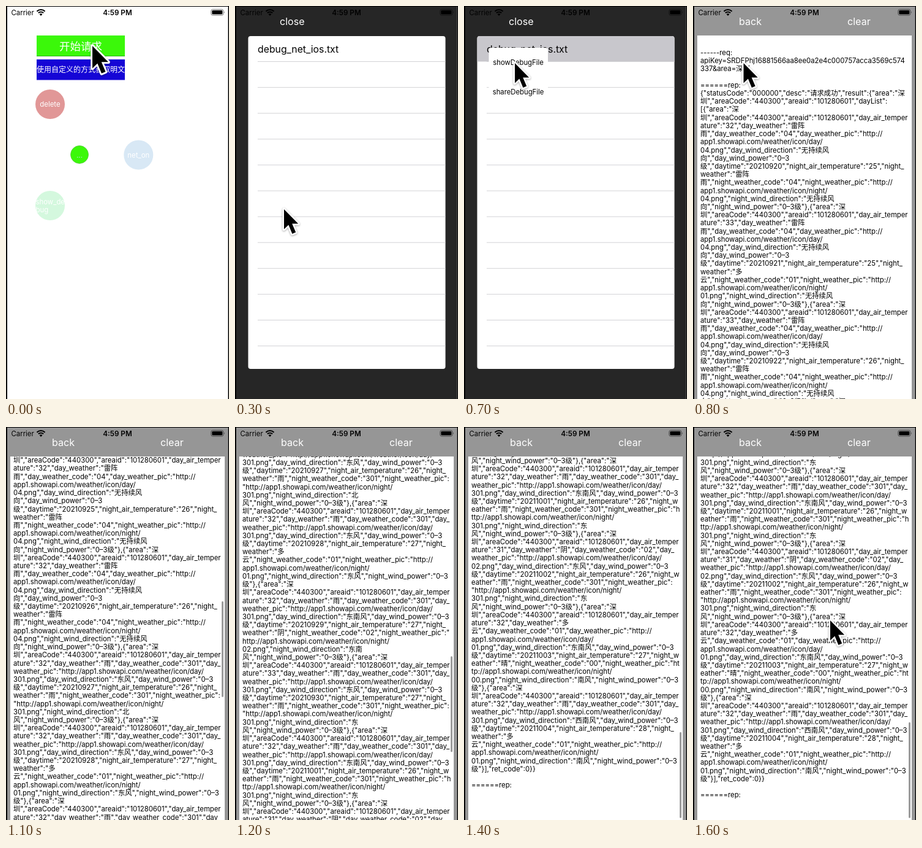
Animation, 364 px wide and 640 px high, one loop 1700 ms. Source, as an HTML page:

```html
<!DOCTYPE html>
<html lang="zh">
<head>
<meta charset="utf-8">
<title>Debug log viewer</title>
<style>
html, body { margin: 0; width: 100%; height: 100%; overflow: hidden; background: #000; }
svg { display: block; width: 100%; height: 100%; }
text { font-family: Inter, "Noto Sans CJK SC", "Noto Sans CJK", sans-serif; white-space: pre; }
.mid { text-anchor: middle; }
.white { fill: #fff; }
.small { font-size: 11.4px; }
.title { font-size: 16.1px; }
</style>
</head>
<body>
<svg viewBox="0 0 364 640" xmlns="http://www.w3.org/2000/svg">
  <defs>
    <clipPath id="view"><rect x="7" y="48" width="350" height="592"/></clipPath>
    <clipPath id="bubble"><circle cx="72" cy="325" r="24"/></clipPath>
  </defs>
  <rect width="364" height="640"/>
  <rect x="2" y="1" width="360.5" height="639" fill="#fff"/>

  <g id="status">
    <text x="8.5" y="14.5" class="small">Carrier</text>
    <g fill="none" stroke="#000" stroke-width="2">
      <path d="M50.4 8.7A9.6 9.6 0 0 1 63.6 8.7"/>
      <path d="M52.8 11.3A6.2 6.2 0 0 1 61.2 11.3"/>
    </g>
    <path d="M57 16L54.6 13.4A3.6 3.6 0 0 1 59.4 13.4Z"/>
    <text x="182" y="14.7" class="mid" font-size="11.7" font-weight="600">4:59 PM</text>
    <rect x="334.8" y="5.5" width="20" height="9.6" rx="2.6" fill="none" stroke="#777"/>
    <rect x="336.3" y="7" width="17" height="6.6" rx="1.4"/>
    <path d="M356 8.6Q357.8 10.3 356 12Z" fill="#777"/>
  </g>

  <g id="menu">
    <rect x="50" y="48" width="144" height="34" fill="#3bf80a"/>
    <path d="M50 81.5H194" stroke="#2cae10"/>
    <text x="122" y="71.5" class="mid white" font-size="17.5" font-weight="300">开始请求</text>
    <rect x="50" y="87" width="144" height="33.5" fill="#1505d6"/>
    <text x="122" y="108.4" class="mid white" font-size="12" font-weight="300">使用自定义的方式获取明文</text>
    <circle cx="72" cy="160" r="24" fill="#e19797"/>
    <text x="72" y="164" class="mid white small">delete</text>
    <circle cx="216.3" cy="242.5" r="24" fill="#d8e8f5"/>
    <text x="216.3" y="246.5" class="mid white small">net_on</text>
    <circle cx="120" cy="242" r="14.5" fill="#3bf80a" stroke="#55c93c" stroke-width=".8"/>
    <text x="120" y="247" class="mid small" fill="#b9d8f2">...</text>
    <circle cx="72" cy="325" r="24" fill="#d4f8de"/>
    <g clip-path="url(#bubble)">
      <text x="48.5" y="322.5" class="white small">show_de</text>
      <text x="48.5" y="336" class="white small">bug</text>
    </g>
  </g>

  <rect id="dim" x="2" y="1" width="360.5" height="639"/>

  <g id="list">
    <text x="73" y="30.8" class="title white">close</text>
    <rect x="21.5" y="49" width="322" height="542" rx="4" fill="#fff"/>
    <path id="picked" d="M21.5 90.5V53a4 4 0 0 1 4-4H339.5a4 4 0 0 1 4 4V90.5Z" fill="#c8c7cc"/>
    <path id="rules" stroke="#cfcfd2" stroke-width=".9"/>
    <text x="37" y="75.6" font-size="15.8">debug_net_ios.txt</text>
    <g id="popup">
      <rect x="40.5" y="68" width="96.5" height="96" rx="4" fill="#fff"/>
      <text x="88.5" y="96" class="mid" font-size="11.3">showDebugFile</text>
      <text x="88.5" y="144" class="mid" font-size="11.3">shareDebugFile</text>
    </g>
  </g>

  <g id="log">
    <text x="75" y="30.8" class="title white">back</text>
    <text x="252" y="30.8" class="title white">clear</text>
    <rect x="7" y="48" width="350" height="592" fill="#fff"/>
    <g clip-path="url(#view)"><g id="lines"></g></g>
    <rect id="bar" x="352" width="3" rx="1.5" fill="#9b9b9b"/>
  </g>

  <path id="cursor" d="M0 0V32.5L7.4 25.4L13.4 40L19.2 37.6L13.2 23.4H23.2Z"
    stroke="#fff" stroke-width="5" stroke-linejoin="round" paint-order="stroke"
    style="filter: drop-shadow(0 1px 1.5px rgba(0,0,0,.35))"/>
</svg>

<script>
const $ = id => document.getElementById(id);
const STEP = 100, STEPS = 17, PITCH = 13.21, REST = 1696;

// date, day: temp weather code wind, night: temp weather code wind, link wrap; "|" is a line end
const STORM = '雷阵|雨 04 无持续风|向';
const days = [
  `0920 32 ${STORM} 25 ${STORM}`,
  `0921 33 ${STORM} 25 多|云 01 无持续风|向`,
  `0922 33 ${STORM} 26 ${STORM}`,
  ...['0923', '0924', '0925', '0926'].map(d => `${d} 32 ${STORM} 26 ${STORM}`),
  '0927 32 雨 301 东风 26 雨 301 北|风 0',
  '0928 32 雨 301 东风 27 多|云 01 东风',
  '0929 32 雨 301 东南风 27 阴 02 东南|风 1',
  '0930 33 雨 301 东风 27 雨 301 东|风 0',
  '1001 32 雨 301 东南风 26 雨 301 东|风 2 w',
  '1002 31 阴 02 东风 26 雨 301 东|风 0 w',
  '1003 32 多|云 01 东南风 27 晴 00 南风 3 w',
  '1004 32 雨 301 西南风 28 多|云 01 南风'
];

const split = (s, n) => s.slice(0, n) + '|' + s.slice(n);
const url = part => `app1.showapi.com/weather/icon/${part}/|`;
const PLACE = '圳","areaCode":"440300","areaid":"101280601","day';

function dayText(row) {
  const [date, t1, w1, c1, d1, t2, w2, c2, d2, wrap, w] = row.split(' ');
  const pic1 = w1.includes('|') ? 'day_weather_pic":"http://|' : 'day_|weather_pic":"http://';
  const pic2 = w2.includes('|') ? '"http://|' : split('"http://', +wrap);
  const key2 = w ? 'night_w|eather' : 'night_|weather';
  const end = d2.includes('|') ? '0–3级' : '0–3|级';
  return PLACE + `_air_temper|ature":"${t1}","day_weather":"${w1}","day_weather_code":"${c1}","` +
    pic1 + url('day') + `${c1}.png","day_wind_direction":"${d1}","day_wind_power":"0–3|` +
    `级","daytime":"2021${date}","night_air_temperature":"${t2}","${key2}":"${w2}",` +
    `"night_weather_code":"${c2}","night_weather_pic":` + pic2 + url('night') +
    `${c2}.png","night_wind_direction":"${d2}","night_wind_power":"${end}"}`;
}

const body = '------req:|apiKey=SRDFPhj16881566aa8ee0a2e4c000757acca3569c574|337&area=深圳||======rep:|' +
  '{"statusCode":"000000","desc":"请求成功","result":{"area":"深|' + PLACE + 'List":|[{"area":"深|' +
  days.map(dayText).join(',{"area":"深|') + '],"ret_code":0}}||======rep:';

// one font size for the whole log, so that a full row fills the text view
const pen = document.createElement('canvas').getContext('2d');
pen.font = '100px Inter, "Noto Sans CJK SC", "Noto Sans CJK", sans-serif';
$('lines').setAttribute('font-size', 33900 / pen.measureText(PLACE + '_air_temper').width);

body.split('|').forEach((row, i) => {
  const el = document.createElementNS('http://www.w3.org/2000/svg', 'text');
  el.setAttribute('x', 12);
  el.setAttribute('y', 80 + i * PITCH);
  el.textContent = row;
  $('lines').append(el);
});

let rules = '';
for (let y = 90.5; y < 560; y += 42.1) rules += `M37 ${y}H343.5`;
$('rules').setAttribute('d', rules);

// keys: [step, ...values]
function at(keys, n) {
  let i = 0;
  while (i < keys.length - 2 && n >= keys[i + 1][0]) i++;
  const [a, b] = [keys[i], keys[i + 1]];
  const k = Math.min(1, Math.max(0, (n - a[0]) / (b[0] - a[0])));
  return a.slice(1).map((v, j) => v + (b[j + 1] - v) * k);
}

const path = [[0, 141, 65, 1.12], [2, 80, 326, 1], [3, 80, 331, 1], [5, 77, 72, 1],
  [7, 83, 93, 1], [8, 82.5, 93, 1], [15, 226, 326, 1], [16, 224, 315, 1]];
const scroll = [[8, 0], [9, 190], [10, 540], [11, 920], [12, 1273], [13, 1570],
  [14, REST + 16], [15, REST + 5], [16, REST]];

const show = (id, on) => $(id).setAttribute('display', on ? 'inline' : 'none');

function draw(ms) {
  const n = Math.floor(ms / STEP) % STEPS;
  show('menu', n < 3);
  show('dim', n >= 3);
  $('dim').setAttribute('opacity', n < 8 ? 0.85 : 0.41);
  show('list', n >= 3 && n < 8);
  show('picked', n >= 6);
  show('popup', n >= 6);
  show('log', n >= 8);

  const [s] = at(scroll, n);
  const over = Math.max(0, s - REST);
  $('lines').setAttribute('transform', `translate(0 ${-s})`);
  show('bar', n > 8);
  $('bar').setAttribute('y', 50 + (s - over) * 0.254 + over);
  $('bar').setAttribute('height', 156 - over);

  const [x, y, size] = at(path, n);
  show('cursor', n <= 8 || n >= 15);
  $('cursor').setAttribute('transform', `translate(${x} ${y}) scale(${size})`);
}

const start = performance.now();
function tick() {
  draw(performance.now() - start);
  requestAnimationFrame(tick);
}
tick();
</script>
</body>
</html>
```
